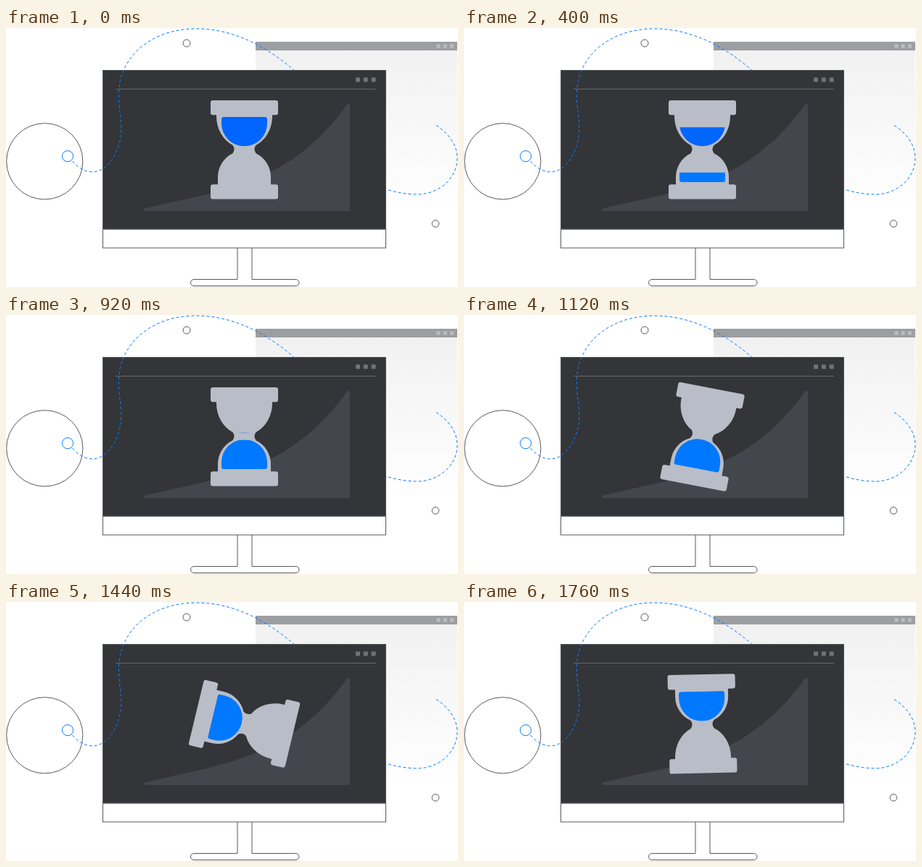
An HTML page with a canvas for the animation above (1.8 s loop, 623x358 px).

```html
<!DOCTYPE html>
<html lang="en">
<head>
<meta charset="utf-8">
<title>Hourglass on a monitor</title>
<style>
  html, body { margin: 0; width: 100%; height: 100%; overflow: hidden; background: #fff; }
  canvas { display: block; width: 623px; height: 358px; }
</style>
</head>
<body>
<canvas id="stage"></canvas>
<script>
const W = 623, H = 358;
const LOOP = 1800, STEP = 40, POUR = 1000;
const CX = 328.5, CY = 168.3;
const LINE = '#58595b', BLUE = '#0a7cff', GLASS = '#b9bdc7';

const canvas = document.getElementById('stage');
const ctx = canvas.getContext('2d');
const dpr = window.devicePixelRatio || 1;
canvas.width = W * dpr;
canvas.height = H * dpr;

const chart = new Path2D(
  'M191 249.5C300 224 391 216 470 106Q474 102.500 474 107V253H191.500' +
  'Q188.500 251 191 249.500Z');
const trail = new Path2D(
  'M91.500 184C100 194 110 199 119 199C143 199 160 165 159 135' +
  'C158 118 155 110 155.500 90C156 40 200 1 262 1C310 1 355 22 397 58.500');
const trailEnd = new Path2D(
  'M593 134.500C612 147 622 163 622 180C622 205 600 229 568 230C555 230 540 228 524 223');
const stand = new Path2D(
  'M319 304V347.500H259a4.500 4.500 0 0 0 0 9H399.500a4.500 4.500 0 0 0 0 -9H339V304');
const bulbs = new Path2D(
  'M290 118V122A38.500 44 0 0 0 312.500 162Q316.500 167.500 312.500 173.200' +
  'A36.500 36.500 0 0 0 292 206V218H365V206A36.500 36.500 0 0 0 344.500 173.200' +
  'Q340.500 167.500 344.500 162A38.500 44 0 0 0 367 122V118Z');
const upperSand = new Path2D(
  'M300 123H357Q360 123 360 126V132A31.500 31.500 0 0 1 297 132V126Q297 123 300 123Z');
const lowerSand = new Path2D(
  'M300 213H357Q360 213 360 210V203.500A31.500 31.500 0 0 0 297 203.500V210Q297 213 300 213Z');

const clamp = x => Math.min(1, Math.max(0, x));
const ease = x => { const p = clamp(x); return p * p * (3 - 2 * p); };
const mix = (a, b, p) => a + (b - a) * p;

function box(x, y, w, h, fill) {
  ctx.fillStyle = fill;
  ctx.fillRect(x, y, w, h);
}

function ring(x, y, r, color) {
  ctx.beginPath();
  ctx.arc(x, y, r, 0, Math.PI * 2);
  ctx.fillStyle = '#fff';
  ctx.fill();
  ctx.strokeStyle = color;
  ctx.stroke();
}

function dots(x, y, size, gap, fill) {
  for (let i = 0; i < 3; i++) box(x + i * gap, y, size, size, fill);
}

function drawWindow() {
  const fade = ctx.createLinearGradient(0, 31, 0, 254);
  fade.addColorStop(0, '#f1f1f2');
  fade.addColorStop(1, '#ffffff');
  box(344, 31, 278, 223, fade);
  box(344, 19, 278, 12, '#9d9ea1');
  dots(593.5, 22.5, 5, 9.2, '#bcbdc0');
}

function drawMonitor() {
  ctx.strokeStyle = LINE;
  box(133.5, 278, 390, 26, '#fff');
  ctx.strokeRect(133.5, 278, 390, 26);
  ctx.stroke(stand);
  box(133.5, 58.5, 390, 219.5, '#333539');
  ctx.strokeRect(133.5, 58.5, 390, 219.5);
  box(151, 84, 359, 1, '#66686a');
  dots(482, 68.5, 6, 10.8, '#707274');
  ctx.fillStyle = '#43474d';
  ctx.fill(chart);
}

function drawTrail() {
  ctx.strokeStyle = BLUE;
  ctx.setLineDash([4, 3]);
  ctx.stroke(trail);
  ctx.stroke(trailEnd);
  ctx.setLineDash([]);
}

function cap(y) {
  ctx.beginPath();
  ctx.roundRect(282, y, 93, 20.3, 3);
  ctx.fill();
}

// Only the part of the sand below the level shows.
function sand(shape, level, bottom, fill) {
  if (level >= bottom) return;
  ctx.save();
  ctx.beginPath();
  ctx.rect(290, level, 77, bottom - level);
  ctx.clip();
  ctx.fillStyle = fill;
  ctx.fill(shape);
  ctx.restore();
}

function drawHourglass(time) {
  const poured = ease(time / POUR);
  const turn = ease((time - POUR) / (LOOP - POUR));
  ctx.save();
  ctx.translate(CX, CY);
  ctx.rotate(Math.PI * turn);
  ctx.translate(-CX, -CY);
  ctx.fillStyle = GLASS;
  ctx.fill(bulbs);
  cap(100);
  cap(216.2);
  sand(upperSand, mix(122.8, 163.5, poured), 163.5, '#0066ff');
  sand(lowerSand, mix(215, 172, poured), 213, '#0078ff');
  ctx.restore();
}

function draw(time) {
  ctx.setTransform(dpr, 0, 0, dpr, 0, 0);
  ctx.lineWidth = 1;
  box(0, 0, W, H, '#fff');
  drawWindow();
  ring(53.3, 184.3, 52.6, LINE);
  ring(249, 21, 5, LINE);
  ring(592, 270.4, 4.8, LINE);
  drawMonitor();
  drawTrail();
  ring(85, 177.2, 7.6, BLUE);
  drawHourglass(time);
}

const start = performance.now();
function tick() {
  const time = (performance.now() - start) % LOOP;
  draw(Math.floor(time / STEP) * STEP);
  requestAnimationFrame(tick);
}
tick();
</script>
</body>
</html>
```
